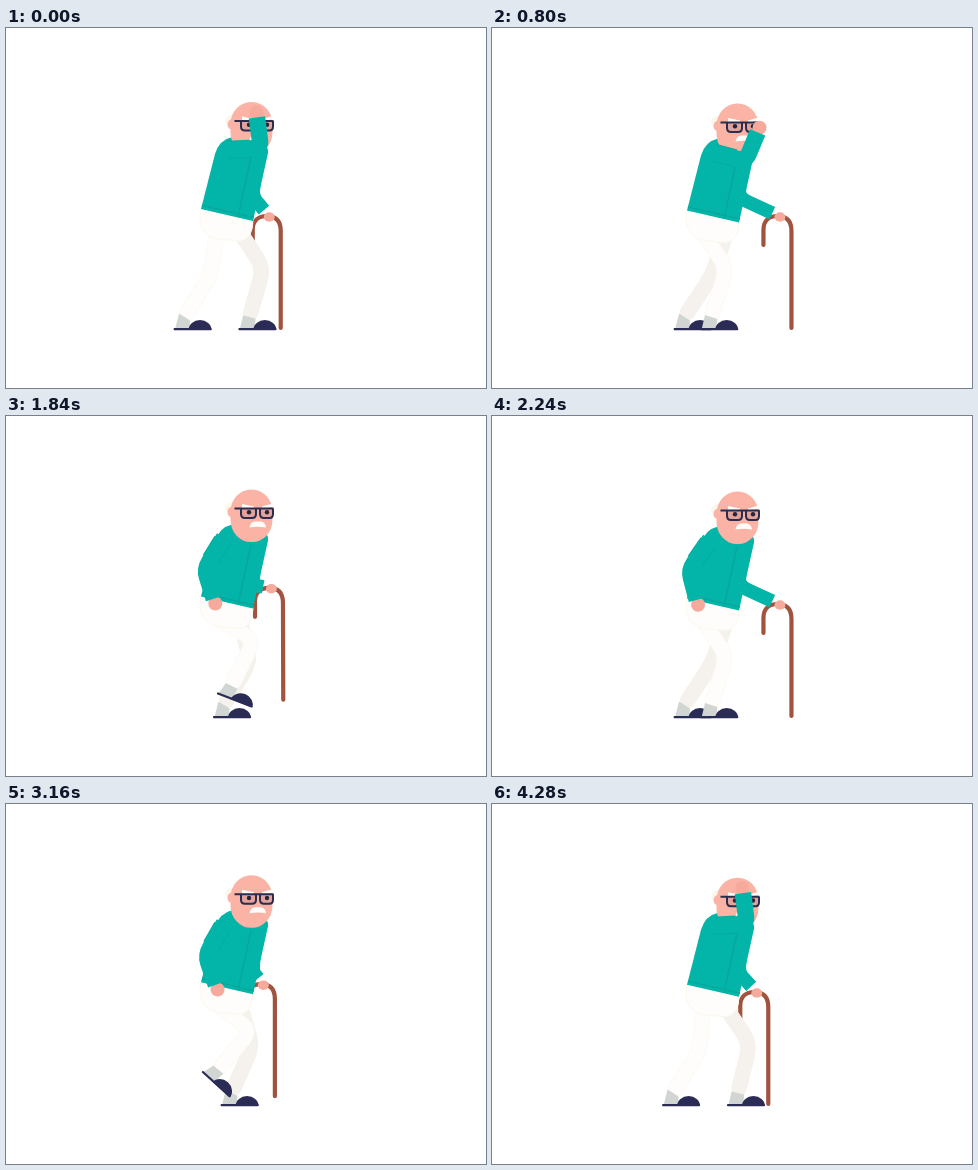
These frames come from a looping animation (480 by 360 pixels, 4.32 s). An HTML page:

```html
<!DOCTYPE html>
<html lang="en">
<head>
<meta charset="utf-8">
<title>Old man walking</title>
<style>
html, body { margin: 0; width: 100%; height: 100%; overflow: hidden; background: #fff; }
svg { display: block; width: 480px; height: 360px; }
path { stroke-linejoin: round; }
.limb { fill: none; stroke-linecap: round; }
.sleeve { fill: none; stroke: #02b5a8; }
.skin { fill: #fab3a4; }
.hand { fill: #f6aa9b; }
.navy { fill: #2b2c56; }
.sock { fill: #d2d6d2; }
.white { fill: #fffdfa; }
.seam { fill: none; stroke: #06a99c; stroke-width: 1.6; }
.frame { fill: #2b2c4e1c; stroke: #2b2c4e; stroke-width: 2; }
</style>
</head>
<body>
<svg viewBox="0 0 480 360">
  <path id="cane" d="M-17 28V13C-17 3-11-1-3-1S11 3 11 14V111" fill="none" stroke="#a0543f" stroke-width="4.2" stroke-linecap="round"/>
  <path id="farSleeve" class="sleeve" stroke-width="13.5"/>
  <ellipse id="farHand" class="hand" rx="5.5" ry="4.7"/>
  <g id="farLeg"></g>
  <g id="nearLeg"></g>
  <g id="body">
    <path fill="#fefdfb" stroke="#fdf8ee" d="M195 180L247 192Q247 211 234 213L212 211Q190 207 195 180Z"/>
    <path fill="#02b5a8" d="M195 181L209 126Q213 112 226 109L250 111Q263 116 262 125L247 193Z"/>
    <path class="seam" d="M245 129L232 189M196 177.500L248 189.500"/>
    <path fill="#fdf6ea" d="M231 86Q222 86 219 91Q219 96 224 98L231 98Z"/>
    <ellipse class="skin" cx="225.500" cy="96.500" rx="4" ry="5"/>
    <rect class="skin" x="224.500" y="74" width="42" height="52.500" rx="20.500" ry="22"/>
    <path class="white" d="M236 88.500L248 91V93H236ZM256 91L266.500 88V91.500L256 93Z"/>
    <path class="frame" d="M228.500 93H267.500M235 93V98.500Q235 102.500 239 102.500H246Q250 102.500 250 98.500V93M254 93V98.500Q254 102.500 258 102.500H263.500Q267 102.500 267 98.500V93"/>
    <circle cx="243" cy="96.700" r="2.200" fill="#29233a"/>
    <circle cx="261" cy="96.700" r="2.200" fill="#29233a"/>
    <path class="white" d="M243.500 112Q244.500 106.500 249 106H255Q259.500 107 260 112Q252 110.500 243.500 112Z"/>
  </g>
  <g id="arm">
    <circle id="hand" class="hand" r="7"/>
    <path id="armEdge" class="seam" style="stroke-width:18"/>
    <path id="nearSleeve" class="sleeve" stroke-width="16.500"/>
  </g>
</svg>
<script>
const LOOP = 4320, CYCLE = 1440, FRAME = 40, GROUND = 302;
const $ = id => document.getElementById(id);
const set = (el, attrs) => { for (const k in attrs) el.setAttribute(k, attrs[k]); };
const mod = (a, n) => ((a % n) + n) % n;
const lerp = (a, b, f) => a + (b - a) * f;
const mix = (p, q, f) => [lerp(p[0], q[0], f), lerp(p[1], q[1], f)];
const smooth = u => { u = Math.min(1, Math.max(0, u)); return u * u * (3 - 2 * u); };
const hump = u => Math.sin(Math.PI * u);
const rad = deg => deg * Math.PI / 180;
const polar = (p, len, deg) => [p[0] + len * Math.cos(rad(deg)), p[1] + len * Math.sin(rad(deg))];

// Foot or cane: u runs 0..1 in the air, then back runs 0..1 on the ground.
function stride(t, start, air) {
  const p = mod(t - start, CYCLE);
  return { u: Math.min(1, p / air), back: Math.max(0, (p - air) / (CYCLE - air)) };
}

// Rise and fall of the upper body over one stride: [time, height].
const bobs = [[0, 0], [280, -2.7], [400, -.4], [720, 2], [1160, -3], [CYCLE, 0]];
function bobAt(t) {
  const p = mod(t, CYCLE), i = bobs.findIndex(b => b[0] > p);
  const [a, b] = [bobs[i - 1], bobs[i]];
  return lerp(a[1], b[1], smooth((p - a[0]) / (b[0] - a[0])));
}

// Two-segment limb with a rounded joint.
const bend = (a, joint, b, cut) => `M${a}L${mix(joint, a, cut)}Q${joint} ${mix(joint, b, cut)}L${b}`;

function knee(hip, ankle, thigh = 43, shin = 51) {
  const dx = ankle[0] - hip[0], dy = ankle[1] - hip[1], d = Math.hypot(dx, dy);
  const along = Math.min(thigh, (thigh * thigh - shin * shin + d * d) / (2 * d));
  const out = Math.sqrt(thigh * thigh - along * along);
  return [hip[0] + (dx * along + dy * out) / d, hip[1] + (dy * along - dx * out) / d];
}

function buildLeg(id, fill, edge) {
  $(id).innerHTML = `
    <path class="limb" stroke="${edge}" stroke-width="15.5"/>
    <path class="limb" stroke="${fill}" stroke-width="14.5"/>
    <path class="sock"/>
    <g class="navy"><rect y="-2" width="38" height="2.2" rx="1"/><path d="M15 0A11.500 10 0 0 1 38 0Z"/></g>`;
  return [...$(id).children];
}

function drawLeg([edge, leg, sock, shoe], hip, t, start, rear) {
  const { u, back } = stride(t, start, 480);
  const x = rear + 61 * (u - back), y = GROUND - 34 * hump(u), tilt = 42 * hump(u) ** 2;
  const at = (dx, dy) => polar(polar([x, y], dx, tilt), dy, tilt + 90);
  const ankle = at(11, -13), k = knee(hip, ankle);
  const shin = Math.atan2(ankle[1] - k[1], ankle[0] - k[0]) * 180 / Math.PI;
  const d = bend(hip, k, mix(ankle, k, .1), .28);
  set(edge, { d });
  set(leg, { d });
  set(sock, { d: `M${polar(ankle, 6.5, shin + 90)}L${polar(ankle, 6.5, shin - 90)}L${at(16, -1)}L${at(1.5, -1)}Z` });
  set(shoe, { transform: `translate(${x} ${y}) rotate(${tilt})` });
}

function drawCane(t, bob) {
  const { u, back } = stride(t, 200, 560);
  const x = lerp(256, 290, smooth(u) - back), y = 189 - 18 * hump(u);
  const tilt = -9 * hump(u ** 3) ** 2;
  const elbow = [247, 169 + bob / 2], grip = [x, y];
  const cuff = mix(grip, elbow, Math.min(.8, 9 / Math.hypot(x - elbow[0], y - elbow[1])));
  set($('cane'), { transform: `translate(${x} ${y}) rotate(${tilt})` });
  set($('farSleeve'), { d: bend([248, 148], elbow, cuff, .3) });
  set($('farHand'), { cx: x - .5, cy: y });
}

function drawArm(t) {
  // The hand wipes the brow, drops to the hip, and comes up again.
  const raised = 1 - smooth((t - 640) / 680) + smooth((t - 3720) / 480);
  const sway = -Math.cos(2 * Math.PI * t / CYCLE);
  const upper = lerp(121 + 4 * sway, -3, raised);
  const fore = lerp(72, -94, raised) + 3.5 * sway;
  const shoulder = [218, 122], elbow = polar(shoulder, 37, upper);
  const wrist = polar(elbow, 31, fore), palm = polar(wrist, 5, fore);
  set($('armEdge'), { d: `M${mix(shoulder, elbow, .1)}L${mix(shoulder, elbow, .7)}` });
  set($('nearSleeve'), { d: bend(shoulder, elbow, wrist, .25) });
  set($('hand'), { cx: palm[0], cy: palm[1] });
}

const farLeg = buildLeg('farLeg', '#f5f2ee', '#f7f1e7');
const nearLeg = buildLeg('nearLeg', '#fefdfb', '#fcf7ec');

function draw(t) {
  const bob = bobAt(t), lift = { transform: `translate(0 ${bob})` };
  set($('body'), lift);
  set($('arm'), lift);
  drawCane(t, bob);
  drawLeg(farLeg, [234, 204 + bob], t, 840, 179);
  drawLeg(nearLeg, [211, 203 + bob], t, 40, 165);
  drawArm(t);
}

const start = performance.now();
function tick() {
  const t = (performance.now() - start) % LOOP;
  draw(Math.floor(t / FRAME) * FRAME);
  requestAnimationFrame(tick);
}
tick();
</script>
</body>
</html>
```
